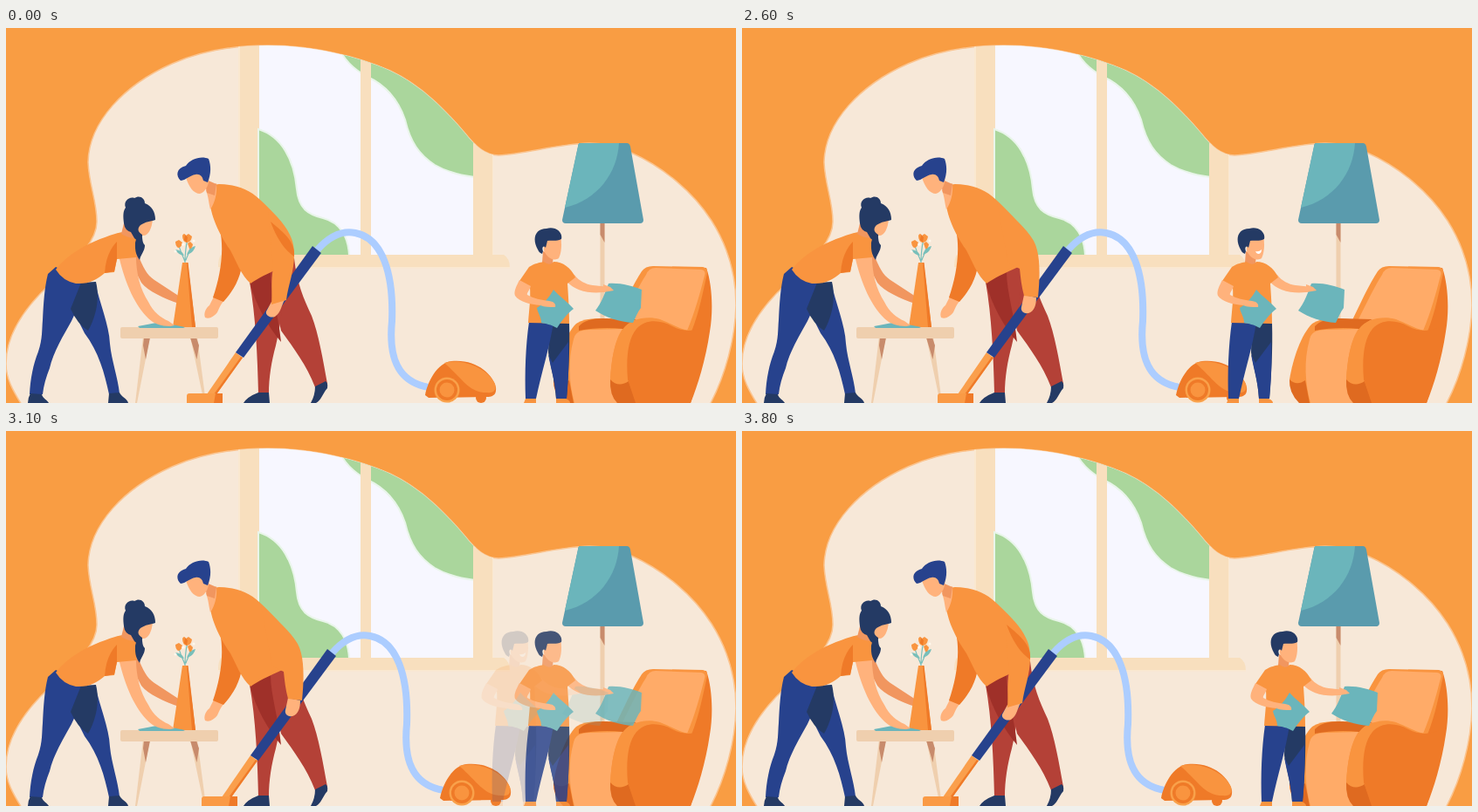
Animation of 836 by 430 pixels, one loop 4800 ms. Source, as an HTML page:

```html
<!DOCTYPE html>
<html lang="en">
<head>
<meta charset="utf-8">
<title>Family cleaning</title>
<style>
html, body { margin: 0; width: 100%; height: 100%; overflow: hidden; background: #f99d43; }
svg { display: block; width: 100vw; height: 100vh; }
.or { fill: #f9943f; } .dor { fill: #ef7a28; } .lor { fill: #ffab68; } .brn { fill: #df6a20; }
.bl { fill: #27428d; } .nv { fill: #243a64; }
.sk { fill: #ffb27c; } .sk2 { fill: #f1965f; }
.red { fill: #b44137; } .dred { fill: #9f3029; }
.te { fill: #6bb5bb; } .dte { fill: #5a9bad; }
.tan { fill: #f8dfbe; } .wood { fill: #efcfae; } .dw { fill: #c88b6c; }
.gr { fill: #aad69c; stroke: #e9f5ea; stroke-width: 2; }
.ln { fill: none; stroke-linecap: round; stroke-linejoin: round; }
</style>
</head>
<body>
<svg viewBox="0 0 836 430" preserveAspectRatio="none">
<defs>
  <path id="blob" d="M18 432C8 416 0 402 0 385C0 352 20 322 50 294C80 266 104 246 104 222C104 198 95 180 94 154C95 107 136 65 190 41C224 26 262 20 300 20C350 20 402 32 440 49C476 66 503 94 526 121C538 136 549 146 564 146C598 144 630 133 668 132C688 132 704 137 716 143C752 159 787 188 808 221C827 251 836 282 836 318C835 356 824 398 806 432Z"/>
  <clipPath id="room"><use href="#blob"/></clipPath>

  <g id="vac">
    <path class="ln" stroke="#accdff" stroke-width="8" style="stroke-linecap:butt" d="M356 255C370 239 385 232 400 235C431 241 444 281 442 336C438 377 448 406 484 412"/>
    <path class="dor" d="M480 421C483 405 494 384 510 382C538 379 558 397 561 412C562 421 557 423 550 423L484 424Z"/>
    <path class="or" d="M502 384C522 378 552 390 560 408C562 415 559 419 550 418C530 418 523 402 502 384Z"/>
    <circle cx="544" cy="424" r="6" class="dor"/>
    <circle cx="505" cy="415" r="14.5" fill="#f9a14a"/>
    <circle cx="505" cy="415" r="12" class="dor"/>
    <circle cx="505" cy="415" r="8.5" class="or"/>
    <path fill="#fa9f4c" d="M263 372L271 378L241 420L230 420Z"/>
    <path class="dor" d="M269 377L271 378L241 420L238 420Z"/>
    <path class="bl" d="M351 250L361 258L272 378L263 372Z"/>
    <path fill="#fa9a45" d="M210 419L245 419Q248 419 248 423L248 430L207 430L207 422Q207 419 210 419Z"/>
    <path class="dor" d="M240 419L248 419L248 430L238 430Z"/>
  </g>

  <g id="boy">
    <path class="nv" d="M622 338L645 338C646 370 644 398 642 425L630 425C629 405 624 390 621 372Z"/>
    <path class="bl" d="M621 374L626 384L644 360C645 385 644 405 642 425L630 425C629 405 624 392 621 374Z"/>
    <path class="bl" d="M599 337L627 337C623 365 614 392 607 425L595 425C594 395 595 365 599 337Z"/>
    <path class="or" d="M595 425L607 425L607 430L593 430ZM630 425L641 425Q646 427 646 430L630 430Z"/>
    <path class="sk" d="M641 279L651 283C656 290 664 294 672 295L691 297L695 301L684 303C668 305 650 301 642 290Z"/>
    <path class="sk2" d="M615 256L627 260L626 270C623 274 617 273 614 269Z"/>
    <path class="or" d="M599 274C605 270 611 269 616 268C621 272 625 271 627 268C638 268 647 275 652 286L643 293C644 308 645 322 645 339L598 338C599 324 601 310 600 297L588 290Z"/>
    <path class="te" d="M627 300C633 307 642 313 650 322C642 328 637 335 631 344C624 340 618 339 613 338C613 331 609 327 608 321C616 316 622 309 627 300Z"/>
    <path class="sk" d="M588 289L601 296C599 302 596 304 597 306C604 310 613 312 622 313C628 314 630 317 629 320C622 320 617 320 612 318C600 317 588 314 583 307C581 302 585 295 588 289Z"/>
    <path class="te" d="M690 293C704 292 717 296 728 300L727 321C723 326 721 332 718 338C703 337 687 332 675 324C682 315 686 304 690 293Z"/>
    <path class="sk" d="M684 294L692 297L696 301L684 303Z"/>
    <path class="sk" d="M616 240L635 239C637 248 636 258 633 264C627 268 619 263 616 255Z"/>
    <path class="nv" d="M609 254C602 242 606 230 619 230C629 227 638 234 636 242C630 245 625 243 620 244L618 252C616 249 613 251 615 256L614 259C611 258 610 256 609 254Z"/>
  </g>
</defs>

<rect width="836" height="430" fill="#f99d43"/>
<use href="#blob" fill="#f7e8d8" stroke="#fbc48f" stroke-width="1.5"/>

<!-- window -->
<g clip-path="url(#room)">
  <path class="tan" d="M266 15H558V262H266Z"/>
  <path fill="#fae8d0" d="M266 15h2V262h-2zM556 130h2V262h-2z"/>
  <path fill="#f7f7ff" d="M290 15H535V260H290Z"/>
  <path class="gr" d="M289 116C315 124 330 150 333 185C335 207 346 214 363 218C383 223 392 240 393 261L289 261Z"/>
  <path class="gr" d="M380 20C387 38 399 48 414 56C436 66 449 82 457 105C463 131 473 145 491 157C505 165 520 169 537 171L537 15Z"/>
  <path class="tan" d="M406 15h12V260h-12zM535 100h22V262h-22z"/>
</g>
<path class="tan" d="M246 260H570Q577 264 577 275H243Q243 264 246 260Z"/>
<path fill="#fae8d0" d="M243 274h334v1.500h-334z"/>

<!-- lamp -->
<path class="wood" d="M680.500 223h5V336h-5z"/>
<path class="dw" d="M680.500 223h5V246L680.500 237Z"/>
<path class="dte" d="M658 132H711Q714 132 715 136L730 220Q730 224 726 224H641Q637 224 637 220L655 136Q655 132 658 132Z"/>
<path class="te" d="M658 132H702C700 166 678 197 640 206L655 136Q655 132 658 132Z"/>

<!-- armchair -->
<path class="dor" d="M790 275L802 275C809 295 810 325 806 348C801 382 792 410 784 430L745 430L750 340Z"/>
<path class="or" d="M698 337C708 316 718 294 728 279Q732 273 741 273L798 274Q804 275 803 281C798 303 794 326 785 348L745 345Z"/>
<path class="lor" d="M706 334C716 314 725 295 733 283Q736 275 744 275L796 277Q802 278 800 284C795 303 789 326 780 347L745 340Z"/>
<path class="or" d="M627 403C631 379 640 352 653 339Q662 332 684 333L720 336L735 430L648 430Q630 428 627 403Z"/>
<path class="brn" d="M627 403C633 409 639 408 645 404L650 430L638 430Q626 418 627 403Z"/>
<path class="brn" d="M656 342Q664 333 684 333L722 334Q712 338 707 345C690 343 671 344 656 347Z"/>
<path class="lor" d="M650 357Q652 346 668 346L706 345C698 357 694 374 692 404L700 430L651 430C645 408 643 382 650 357Z"/>
<path class="or" d="M692 404C693 380 697 359 706 346C715 333 734 330 749 334C762 339 771 345 783 347L760 430L718 430Z"/>
<path class="brn" d="M692 403C698 410 706 410 713 405L722 430L700 430Q691 421 692 403Z"/>
<path class="dor" d="M712 403C710 379 712 357 722 345C733 333 750 335 763 342C776 349 790 348 800 342L800 375L784 430L721 430Z"/>

<!-- woman's back side -->
<path class="bl" d="M76 322L102 291C107 315 118 340 119 362C121 382 128 400 130 419L118 420C113 396 106 371 90 350Z"/>
<path class="bl" d="M48 282L57 274L94 292C87 306 82 322 75 336C66 352 54 372 50 390C46 400 43 410 42 420L27 420C28 402 31 386 37 371C42 356 41 345 42 335C43 315 44 298 48 282Z"/>
<path class="nv" d="M74 322L86 292L103 291C108 312 102 333 94 347Q82 340 74 322Z"/>
<path class="nv" d="M28 419L41 420C42 425 48 427 49 430L25 430Q25 424 28 419ZM118 419L130 418C132 423 139 425 140 430L117 430Z"/>
<path class="sk2" d="M140 263L151 260C157 274 161 283 170 289L199 308L198 316C181 310 163 302 155 292Z"/>

<!-- table and vase -->
<path class="wood" d="M157 354H165L150 430H148ZM211 354H219L229 430H227Z"/>
<path class="dw" d="M158 355H165L160 380L157 364ZM211 355H218L221 364L218.500 380Z"/>
<rect class="wood" x="131" y="343" width="112" height="13" rx="2"/>
<g class="ln" stroke="#78bfba" stroke-width="1.200">
  <path d="M205 270C205 259 206 250 208 242M205 268C202 260 199 255 198 249M206 266C208 260 211 256 211 251"/>
</g>
<path fill="#78bfba" d="M204 261Q197 260 194 254Q202 255 204 261ZM207 260Q210 251 217 250Q215 258 207 260Z"/>
<path class="or" d="M202 238Q204 234 206 238L209 236L213 239Q212 246 207 246Q202 245 202 238ZM194 245L198 243L202 246Q201 252 197 252Q194 250 194 245ZM208 247L211 245L214 248Q213 254 210 253Z"/>
<path class="dor" d="M205 237L208 240L207 246L204 243Z"/>
<g fill="#fff8ed"><circle cx="203" cy="248" r="1.800"/><circle cx="215" cy="244" r="1.500"/><circle cx="194" cy="256" r="1.500"/></g>
<path class="or" d="M202 269H208L217 343H191Z"/>
<path class="dor" d="M207 269H208.500L217 343H213Z"/>

<!-- woman's reaching arm -->
<g class="mix" data-start="2000">
  <g>
    <path class="te" d="M151 342Q162 340 172 338Q189 339 205 343L203 344H153Z"/>
    <path class="sk" d="M129 261L149 262C149 282 154 300 163 314C169 326 177 332 186 336L193 341L188 342C178 342 169 339 163 333C148 318 137 295 129 261Z"/>
  </g>
  <g>
    <path class="te" d="M170 334C184 326 204 323 224 323C211 331 190 331 170 334Z"/>
    <path class="sk" d="M129 261L149 262C151 280 156 293 165 303C173 311 181 316 190 319L201 322L198 326L187 328C176 326 162 318 153 308C141 295 134 281 129 261Z"/>
  </g>
</g>
<path class="or" d="M57 277C72 257 99 244 125 236C138 231 151 237 152 250L149 263L127 265L124 280L113 281C104 288 96 294 80 293Q65 290 57 277Z"/>
<path class="dor" d="M127 245C119 253 114 265 113 281L124 279L127 265Z"/>
<path class="nv" d="M151 235C159 237 154 244 159 249C159 256 154 260 153 266C147 258 148 251 148 246Z"/>
<path class="sk2" d="M135 224L149 230L150 241Q139 241 132 236Z"/>
<path class="sk" d="M145 221L168 219C167 230 163 239 156 238C149 236 144 230 145 221Z"/>
<path class="nv" d="M135 224C134 215 134 210 137 206C134 199 141 193 147 195C153 191 159 195 159 201C167 204 171 211 171 220C165 222 160 222 154 226C150 230 151 234 156 237C157 242 150 245 147 241L143 234Q136 232 135 224Z"/>

<!-- man -->
<g class="mix" data-start="2000">
  <g>
    <path class="sk" d="M238 308L250 312C245 318 244 322 242 326C238 331 233 334 228 332C226 327 229 321 233 318Z"/>
    <path class="dor" d="M245 231C250 254 246 283 237 309L249 314C261 301 270 285 271 264Z"/>
  </g>
  <g>
    <path class="sk" d="M246 311L258 313C259 321 258 328 253 333C248 337 243 335 242 331C243 326 246 320 246 311Z"/>
    <path class="dor" d="M245 231C252 257 249 286 246 312L258 314C265 299 270 284 271 264Z"/>
  </g>
</g>
<path class="red" d="M300 280L330 264C333 292 341 311 350 330C358 351 363 380 368 408L354 412C344 386 330 368 315 347Z"/>
<path class="red" d="M279 291L322 264C317 308 316 336 309 364C304 382 301 401 301 419L289 419C288 376 286 331 279 291Z"/>
<path class="dred" d="M279 291L303 280C303 302 312 329 315 360C300 342 286 318 279 291Z"/>
<path class="nv" d="M289 418L301 418L302 430H272Q276 423 289 418ZM354 411L366 405Q369 407 368 413C362 420 361 427 355 430H349Q354 421 354 411Z"/>
<path class="or" d="M233 192C235 183 238 179 244 179C262 179 279 185 290 196C306 211 319 224 325 237C331 249 330 258 329 266C322 274 300 279 280 293C269 283 264 268 257 255C246 239 233 216 233 192Z"/>
<path class="sk" d="M229 186L241 178C242 190 239 201 234 208C232 200 232 194 229 186Z"/>
<path class="sk2" d="M227 173L241 179L239 192L230 189Z"/>
<path class="sk" d="M206 171C213 165 223 164 232 168C234 178 229 188 222 190C215 190 209 182 206 171Z"/>
<path class="bl" d="M200 175C194 169 195 161 206 158C211 150 224 146 232 150C235 158 235 167 231 177L226 175C225 170 222 167 217 168C210 169 207 174 200 175Z"/>

<!-- vacuum and working arm -->
<g class="mix" data-start="3200">
  <g>
    <use href="#vac"/>
    <path class="sk" d="M304 314L319 312C315 319 315 326 308 331C302 333 297 329 298 325Z"/>
    <path class="or" d="M300 210C317 226 329 241 330 260C330 280 323 295 321 312L304 317C305 302 303 291 306 275Z"/>
    <path class="dor" d="M303 222C309 239 318 254 330 262C331 248 324 239 303 222Z"/>
  </g>
  <g>
    <use href="#vac" x="17"/>
    <path class="sk" d="M323 306L337 309C337 317 335 325 328 327C322 328 319 324 320 320Z"/>
    <path class="or" d="M292 200C310 216 326 230 334 244C341 257 342 279 339 309L323 307C320 296 319 286 318 276L305 270Z"/>
  </g>
</g>

<!-- boy -->
<g class="mix" data-start="2600">
  <g><use href="#boy"/></g>
  <g>
    <use href="#boy" x="-38"/>
    <path fill="#fff" d="M588 256Q592 257 595 254Q595 259 591 259Q589 259 588 256Z"/>
  </g>
</g>
</svg>
<script>
const LOOP = 4800, JUMP = 2000, STEP = 100, STEPS = 6;
const mixes = [...document.querySelectorAll('.mix')].map(el => ({
  start: +el.dataset.start, rest: el.children[0], away: el.children[1]
}));

function setAlpha(el, a) {
  el.style.opacity = a;
  el.style.display = a ? '' : 'none';
}

// Every pose jumps away at once, then each fades back in turn.
function draw(t) {
  for (const { start, rest, away } of mixes) {
    const n = Math.floor((t - start) / STEP);
    const p = t < JUMP ? 1 : Math.min(STEPS, Math.max(0, n)) / STEPS;
    setAlpha(rest, p);
    setAlpha(away, 1 - p);
  }
}

const t0 = performance.now();
function tick() {
  draw((performance.now() - t0) % LOOP);
  requestAnimationFrame(tick);
}
draw(0);
requestAnimationFrame(tick);
</script>
</body>
</html>
```
